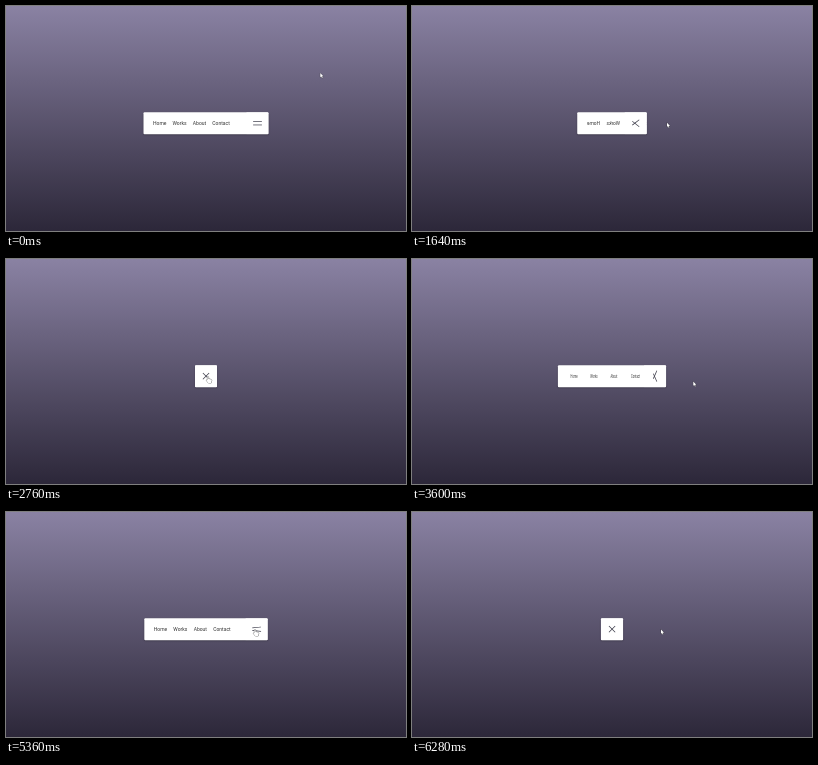
An HTML page with a canvas that plays this animation: 400 px wide and 225 px high, repeating every 6320 ms.

```html
<!DOCTYPE html>
<html lang="en">
<head>
<meta charset="utf-8">
<title>Animated navigation</title>
<style>
  html, body { margin: 0; height: 100%; overflow: hidden; background: #2c2739; }
  canvas { display: block; width: 400px; height: 225px; }
</style>
</head>
<body>
<canvas id="stage"></canvas>
<script>
const LOOP = 6320, DURATION = 1000;
const OPEN = 125, CLOSED = 22, TOP = 106.2, HEIGHT = 22, MIDDLE = TOP + HEIGHT / 2;
const LINKS = [["Home", 16.2], ["Works", 36], ["About", 56], ["Contact", 77.6]];
const CLICKS = [1328, 3064, 5332];

// time, x, y of the pointer's hot spot
const PATH = [
  [0, 314.3, 67], [40, 314, 67.4], [340, 288, 88], [640, 258, 111.5], [720, 255, 116.7],
  [2320, 255, 116.7], [2560, 226, 118], [2760, 202, 117.5],
  [3160, 202, 117.5], [3400, 250, 120], [3600, 281.3, 122.5], [3680, 281.3, 122.5],
  [4280, 281.3, 122.5], [4320, 278.6, 122.3], [4480, 266, 121],
  [4640, 266, 121], [4880, 249, 117.5], [LOOP, 249, 117.5]
];

const canvas = document.getElementById("stage");
const ratio = window.devicePixelRatio || 1;
canvas.width = 400 * ratio;
canvas.height = 225 * ratio;
const ctx = canvas.getContext("2d");
ctx.scale(ratio, ratio);

const backdrop = ctx.createLinearGradient(0, 0, 0, 225);
backdrop.addColorStop(0, "#8a82a3");
backdrop.addColorStop(1, "#2c2739");

const mix = (a, b, k) => a + (b - a) * k;

// CSS "ease": cubic-bezier(.25, .1, .25, 1)
function ease(x) {
  if (x <= 0) return 0;
  if (x >= 1) return 1;
  let low = 0, high = 1;
  for (let i = 0; i < 24; i++) {
    const s = (low + high) / 2;
    if (0.75 * s * (1 - s) + s ** 3 < x) low = s; else high = s;
  }
  return 0.3 * low * (1 - low) ** 2 + 3 * low * low * (1 - low) + low ** 3;
}

function opennessAt(t) {
  const [close, reopen, closeAgain] = CLICKS.map(start => ease((t - start) / DURATION));
  return 1 - close + reopen - closeAgain;
}

function pointerAt(t) {
  const i = PATH.findIndex(point => point[0] > t);
  const [t0, x0, y0] = PATH[i - 1], [t1, x1, y1] = PATH[i];
  const k = (t - t0) / (t1 - t0);
  return [mix(x0, x1, k), mix(y0, y1, k)];
}

function at(x, y, draw) {
  ctx.save();
  ctx.translate(x, y);
  draw();
  ctx.restore();
}

function box(x, width) {
  ctx.beginPath();
  ctx.roundRect(x, TOP, width, HEIGHT, 1);
}

function drawLinks(left, open) {
  ctx.fillStyle = "#333";
  ctx.font = "5px Roboto, sans-serif";
  ctx.textAlign = "center";
  for (const [label, offset] of LINKS) {
    at(left + offset, 118.8, () => {
      ctx.scale(Math.cos(open * 2 * Math.PI), 1);
      ctx.fillText(label, 0, 0);
    });
  }
}

function drawIcon(right, open) {
  ctx.fillStyle = "#fff";
  ctx.fillRect(right - CLOSED, TOP, CLOSED, HEIGHT);
  ctx.fillStyle = "#3a3a48";
  for (const side of [-1, 1]) {
    at(right - 11, MIDDLE + side * 1.75 * open, () => {
      ctx.rotate(side * (1 - open) * 405 * Math.PI / 180);
      ctx.fillRect(-4.4, -0.35, 8.8, 0.7);
    });
  }
}

function drawNav(open) {
  const width = mix(CLOSED, OPEN, open);
  const left = 200 - width / 2, right = 200 + width / 2;
  ctx.save();
  ctx.shadowColor = "rgba(0, 0, 0, .3)";
  ctx.shadowBlur = 2 * ratio;
  ctx.shadowOffsetY = 0.7 * ratio;
  ctx.fillStyle = "#fff";
  box(left, width);
  ctx.fill();
  ctx.restore();

  ctx.save();
  box(left, width);
  ctx.clip();
  drawLinks(left, open);
  drawIcon(right, open);
  ctx.restore();
  return right;
}

const ARROW = new Path2D("M0 0V4.2L1 3.4L1.7 5L2.4 4.7L1.7 3.2H3Z");
const HAND = new Path2D("M-.6 .4Q0-.4.6.4V2.4L3.2 3Q3.8 3.2 3.7 4L3.2 6.4H.3L-1.6 3.9Q-1.5 3-.6 3.5Z");

function drawPointer(x, y, hovering) {
  at(x, y, () => {
    const shape = hovering ? HAND : ARROW;
    ctx.lineWidth = hovering ? 0.7 : 0.5;
    ctx.strokeStyle = "#333";
    ctx.fillStyle = "#fff";
    ctx.stroke(shape);
    ctx.fill(shape);
  });
}

function render(now) {
  const t = now % LOOP;
  ctx.fillStyle = backdrop;
  ctx.fillRect(0, 0, 400, 225);
  const right = drawNav(opennessAt(t));
  const [x, y] = pointerAt(t);
  const hovering = x > right - CLOSED && x < right && y > TOP && y < TOP + HEIGHT;
  drawPointer(x, y, hovering);
  requestAnimationFrame(render);
}
requestAnimationFrame(render);
</script>
</body>
</html>
```
